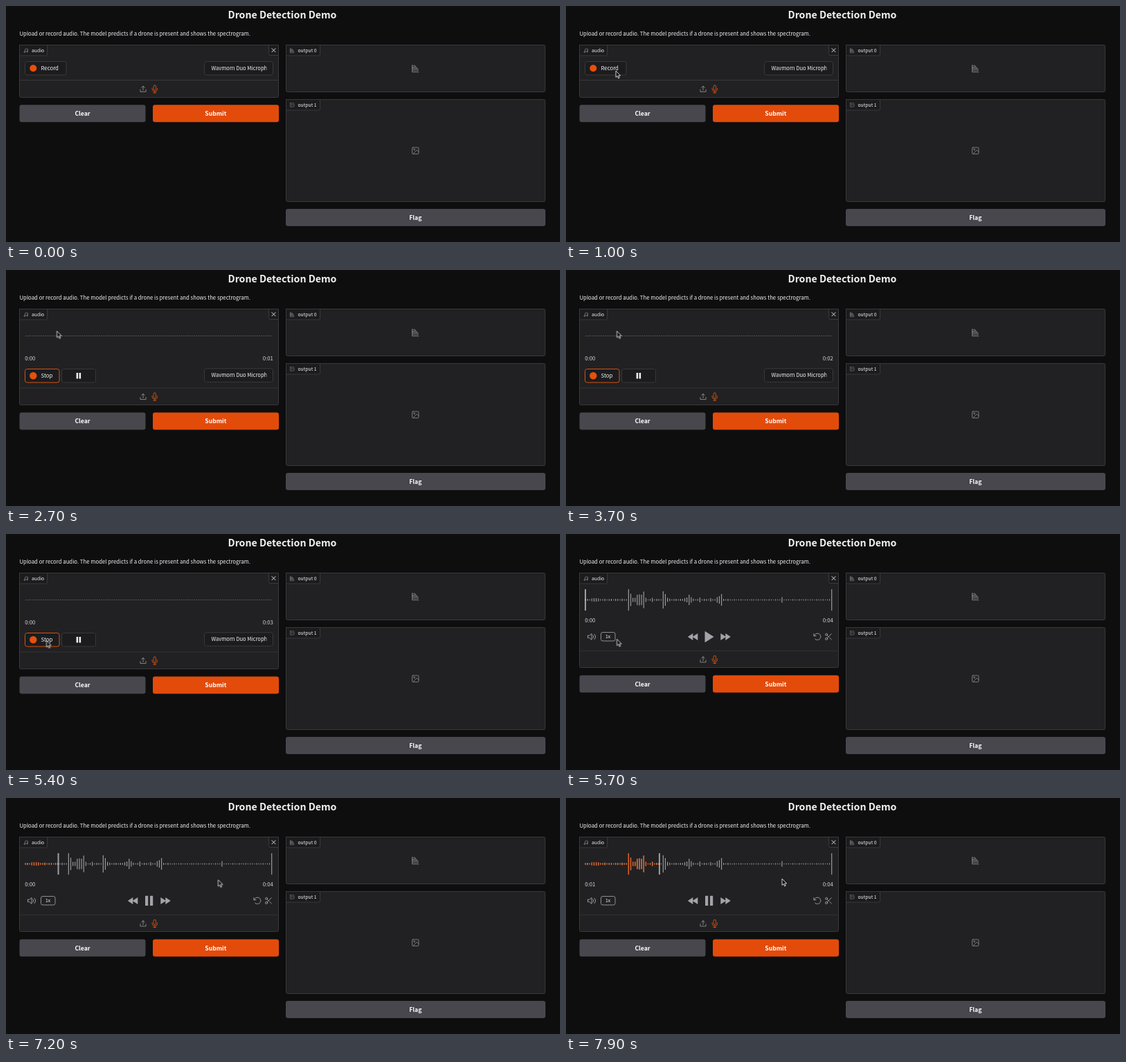
Write an HTML page that moves like this. It is 800 px wide and 342 px high and loops after 8000 ms.

```html
<!DOCTYPE html>
<html lang="en">
<head>
<meta charset="utf-8">
<title>Drone Detection Demo</title>
<style>
html, body { margin: 0; width: 100%; height: 100%; overflow: hidden; background: #0e0e0f; }
svg { display: block; }
text { font: 7.78px "Noto Sans CJK JP", "Noto Sans CJK SC", "Noto Sans CJK", "Open Sans", sans-serif; fill: #f2f2f3; }
.title { font-size: 14.15px; font-weight: 600; text-anchor: middle; }
.btn text { font-size: 8.65px; font-weight: 600; text-anchor: middle; fill: #fff; }
.small { font-size: 6.8px; }
.device { font-size: 7.6px; }
.time text { fill: #d6d6d9; }
.end { text-anchor: end; }
.panel { fill: #212123; stroke: #39393d; }
.box { fill: #1c1c1e; stroke: #39393d; }
.line { stroke: #39393d; }
.btn rect { fill: #47474d; }
.btn .main { fill: #e34b0b; }
.icon { fill: none; stroke: #a3a3aa; stroke-width: 1.7; stroke-linecap: round; stroke-linejoin: round; }
.dim { stroke: #85858c; }
.hot { stroke: #e8580f; }
.dot { fill: #e8500c; }
.solid { fill: #a3a3aa; }
.orange { fill: #f0641a; }

/* 8 s loop: recording starts at 20%, ends at 70%, playback from 83% */
.a { animation: 8s step-end infinite; }
.idle { animation-name: idle; }
.rec { animation-name: rec; }
.done { animation-name: done; }
.lower { animation-name: lower; }
.body { animation-name: body; }
.tick { animation-name: tick; }
.elapsed { animation-name: elapsed; }
.play { animation-name: play; }
.pause { animation-name: pause; }
#heard, .head { animation: 8s linear infinite; }
#heard { animation-name: heard; }
.head { animation-name: head; }
.pointer { animation: pointer 8s linear infinite; }

@keyframes idle { 0% { opacity: 1 } 20%, 100% { opacity: 0 } }
@keyframes rec { 0% { opacity: 0 } 20% { opacity: 1 } 70%, 100% { opacity: 0 } }
@keyframes done { 0% { opacity: 0 } 70%, 100% { opacity: 1 } }
@keyframes lower {
  0% { transform: translateY(0) }
  20% { transform: translateY(63.3px) }
  70%, 100% { transform: translateY(61.6px) }
}
@keyframes body { 0% { height: 76px } 20% { height: 139px } 70%, 100% { height: 137px } }
@keyframes tick {
  0% { transform: translateY(0) }
  32.5% { transform: translateY(-20px) }
  45% { transform: translateY(-40px) }
  57.5%, 100% { transform: translateY(-60px) }
}
@keyframes elapsed { 0% { transform: translateY(0) } 95.5%, 100% { transform: translateY(-20px) } }
@keyframes play {
  0% { opacity: 1; fill: #a3a3aa }
  79.4% { opacity: 1; fill: #f0641a }
  82.5%, 100% { opacity: 0; fill: #f0641a }
}
@keyframes pause {
  0% { opacity: 0; fill: #f0641a }
  82.5% { opacity: 1; fill: #f0641a }
  85.6%, 100% { opacity: 1; fill: #a3a3aa }
}
@keyframes heard { 0%, 83% { width: 0 } 100% { width: 115.3px } }
@keyframes head { 0%, 83% { transform: translateX(0) } 100% { transform: translateX(115.3px) } }
@keyframes pointer {
  0%, 3.74% { opacity: 0; transform: translate(164px, 221px) }
  3.75% { opacity: 1; transform: translate(164px, 221px) }
  5% { transform: translate(156px, 215px) }
  7.5% { transform: translate(156px, 215px); animation-timing-function: ease-in-out }
  11.9%, 17.5% { transform: translate(72px, 94px) }
  20.6% { transform: translate(73.5px, 88.5px) }
  55% { transform: translate(73.5px, 88.5px); animation-timing-function: ease-in-out }
  63.75% { transform: translate(58.5px, 154.5px) }
  70.6% { transform: translate(58.5px, 154.5px); animation-timing-function: ease-in-out }
  73.75% { transform: translate(224px, 130px) }
  75%, 78.1% { transform: translate(209.5px, 130px) }
  80% { transform: translate(209.5px, 144.5px) }
  83.75% { transform: translate(209.5px, 144.5px); animation-timing-function: ease-in-out }
  91.25%, 100% { opacity: 1; transform: translate(312px, 117px) }
}
</style>
</head>
<body>
<svg width="800" height="342" viewBox="0 0 800 342">
  <defs>
    <clipPath id="progress"><rect id="heard" x="28" y="78" width="0" height="36"/></clipPath>
    <clipPath id="recTime"><rect x="360" y="120" width="30" height="15"/></clipPath>
    <clipPath id="playTime"><rect x="20" y="116" width="30" height="15"/></clipPath>
    <clipPath id="deviceBox"><rect x="287" y="80" width="89.5" height="20"/></clipPath>
    <g id="device">
      <rect class="box" x="286.5" y="80.5" width="99" height="19.5" rx="3"/>
      <text class="device" x="296.5" y="93" clip-path="url(#deviceBox)">Wavmorn Duo Microph</text>
    </g>
    <path id="chart" d="M3 2V22H22M3 3H12V8H3M3 8H16V13H3M3 13H20V18H3"/>
    <g id="image">
      <rect x="3" y="3" width="18" height="18" rx="2"/>
      <circle cx="8.5" cy="8.5" r="1.6"/>
      <path d="M21 15L16 10 5 21"/>
    </g>
    <path id="skip" d="M0 0L7 4.5V0L14.5 5 7 10V5.5L0 10Z"/>
  </defs>

  <text class="title" x="399" y="18.2">Drone Detection Demo</text>
  <text x="19.5" y="42.6">Upload or record audio. The model predicts if a drone is present and shows the spectrogram.</text>

  <!-- input panel -->
  <rect class="panel a body" x="19.5" y="56.5" width="374" height="76" rx="2"/>
  <path class="box" d="M19.5 72V56.5H59.5V70Q59.5 72 57.5 72Z"/>
  <g class="icon" transform="translate(24.8 61) scale(.31)">
    <path d="M9 18V5L21 3V16"/><circle cx="6" cy="18" r="3"/><circle cx="18" cy="16" r="3"/>
  </g>
  <text class="small" x="37" y="66.9">audio</text>
  <path class="box" d="M393.5 56.5V71.5H381.5Q379.5 71.5 379.5 69.5V56.5Z"/>
  <path d="M383.6 61.2L389.4 67M389.4 61.2L383.6 67" stroke="#d8d8dc"/>

  <g class="a idle">
    <rect class="box" x="27.5" y="80.5" width="59.5" height="19.5" rx="3"/>
    <circle class="dot" cx="39.3" cy="90.2" r="5"/>
    <text x="50.5" y="93.1">Record</text>
    <use href="#device"/>
  </g>

  <g class="a rec">
    <path d="M28 95.5H384.5" stroke="#5f5f65" stroke-dasharray="1.7 1.42"/>
    <g class="time">
      <text x="27.3" y="131.2">0:00</text>
      <g clip-path="url(#recTime)"><g class="a tick end">
        <text x="385.8" y="131.2">0:00</text>
        <text x="385.8" y="151.2">0:01</text>
        <text x="385.8" y="171.2">0:02</text>
        <text x="385.8" y="191.2">0:03</text>
      </g></g>
    </g>
    <rect class="box" x="27.5" y="143.5" width="49.5" height="19.5" rx="3" style="stroke:#d9500f"/>
    <circle class="dot" cx="39.3" cy="153.2" r="5.2"/>
    <text x="50.5" y="156.1">Stop</text>
    <rect class="box" x="80.5" y="143.5" width="49" height="19.5" rx="3"/>
    <path d="M101.6 149h2.5v8.4h-2.5zM105.6 149h2.5v8.4h-2.5z" fill="#f2f2f3"/>
    <use href="#device" y="62.3"/>
  </g>

  <g class="a done">
    <path class="bars" stroke="#98989f" stroke-width="1.2"/>
    <path class="bars" stroke="#e8641f" stroke-width="1.3" clip-path="url(#progress)"/>
    <path class="head" d="M28 80V111" stroke="#e4e4e8" stroke-width="1.3"/>
    <g class="time">
      <g clip-path="url(#playTime)"><g class="a elapsed">
        <text x="27.3" y="127.8">0:00</text>
        <text x="27.3" y="147.8">0:01</text>
      </g></g>
      <text class="end" x="385.8" y="127.8">0:04</text>
    </g>
    <g class="icon" transform="translate(30.4 142.2) scale(.56)">
      <path d="M2 9V15H6L12 20V4L6 9Z"/>
      <path d="M15.5 8.5Q18.5 12 15.5 15.5M19 5.5Q25 12 19 18.5"/>
    </g>
    <rect x="50.5" y="142.5" width="20.5" height="12.5" rx="2.5" fill="none" stroke="#8f8f96"/>
    <text class="small" x="57" y="151.4">1x</text>
    <use class="solid" href="#skip" transform="translate(190.3 144) scale(-1 1)"/>
    <use class="solid" href="#skip" transform="translate(223.3 144)"/>
    <path class="a play" d="M200.5 140.8L213.5 149 200.5 157.2Z"/>
    <path class="a pause" d="M201 141.8h4.2v14.2h-4.2zM208 141.8h4.2v14.2h-4.2z"/>
    <g class="icon" transform="translate(356.8 142.4) scale(.53)">
      <path d="M2 4V10H8M3 10A9 9 0 1 1 5.5 18.5"/>
    </g>
    <g class="icon" transform="translate(373 142.6) scale(.52)">
      <circle cx="6" cy="6" r="3"/><circle cx="6" cy="18" r="3"/>
      <path d="M20 4L8.1 15.9M14.5 14.5L20 20M8.1 8.1L12 12"/>
    </g>
  </g>

  <!-- source icons and buttons slide with the panel height -->
  <g class="a lower">
    <path class="line" d="M20 107.5H393"/>
    <path class="icon" transform="translate(192.6 114.8) scale(.45)" d="M3 14V21H21V14M12 16V3M7 8L12 3 17 8"/>
    <g class="icon hot" transform="translate(208.8 114.3) scale(.5)">
      <rect x="8.5" y="1" width="7" height="14" rx="3.5"/>
      <path d="M4.5 10V12Q4.5 19 12 19T19.5 12V10M12 19V23M8 23H16"/>
    </g>
    <g class="btn">
      <rect x="19.5" y="143.2" width="182" height="25" rx="3"/>
      <text x="110.5" y="159.2">Clear</text>
      <rect class="main" x="212" y="143.2" width="182" height="25" rx="3"/>
      <text x="302.8" y="159.2">Submit</text>
    </g>
  </g>

  <!-- outputs -->
  <rect class="panel" x="404.5" y="56.5" width="374" height="68" rx="2"/>
  <path class="box" d="M404.5 72V56.5H453.5V70Q453.5 72 451.5 72Z"/>
  <use class="icon dim" href="#chart" transform="translate(409.4 61) scale(.31)"/>
  <text class="small" x="421.5" y="66.9">output 0</text>
  <use class="icon dim" href="#chart" transform="translate(585 84.8) scale(.5)"/>

  <rect class="panel" x="404.5" y="135.5" width="374" height="148" rx="2"/>
  <path class="box" d="M404.5 151V135.5H453.5V149Q453.5 151 451.5 151Z"/>
  <use class="icon dim" href="#image" transform="translate(409.4 139.7) scale(.31)"/>
  <text class="small" x="421.5" y="145.7">output 1</text>
  <use class="icon dim" href="#image" transform="translate(585 203.5) scale(.52)"/>

  <g class="btn">
    <rect x="404" y="294" width="375" height="25" rx="3"/>
    <text x="591.3" y="310.1">Flag</text>
  </g>

  <path class="pointer" d="M0 0V9.4L2.2 7.4 3.7 10.8 5.2 10.1 3.7 6.9H6.7Z" fill="#111" stroke="#e2e2e2" stroke-width=".9"/>
</svg>
<script>
// Loud bars by index; the rest is a quiet murmur that fades out.
const peaks = {
  3: 4, 4: 5, 5: 5, 6: 4, 20: 31, 21: 18, 22: 6, 23: 6, 24: 15, 25: 16, 26: 15, 27: 24, 28: 6, 31: 6,
  36: 25, 37: 17, 38: 6, 46: 5, 47: 7, 48: 15, 49: 8, 53: 7, 58: 5, 61: 8, 62: 11, 63: 17, 91: 8, 114: 31
};
const murmur = k => (k < 67 ? 2.4 : 1.5) + Math.sin(k * 2.3) * (k < 67 ? 1 : 0.4);
let d = "";
for (let k = 0; k < 115; k++) {
  const h = peaks[k] || murmur(k);
  d += `M${(28 + k * 3.12).toFixed(2)} ${(95.5 - h / 2).toFixed(2)}v${h.toFixed(2)}`;
}
document.querySelectorAll(".bars").forEach(p => p.setAttribute("d", d));
</script>
</body>
</html>
```
